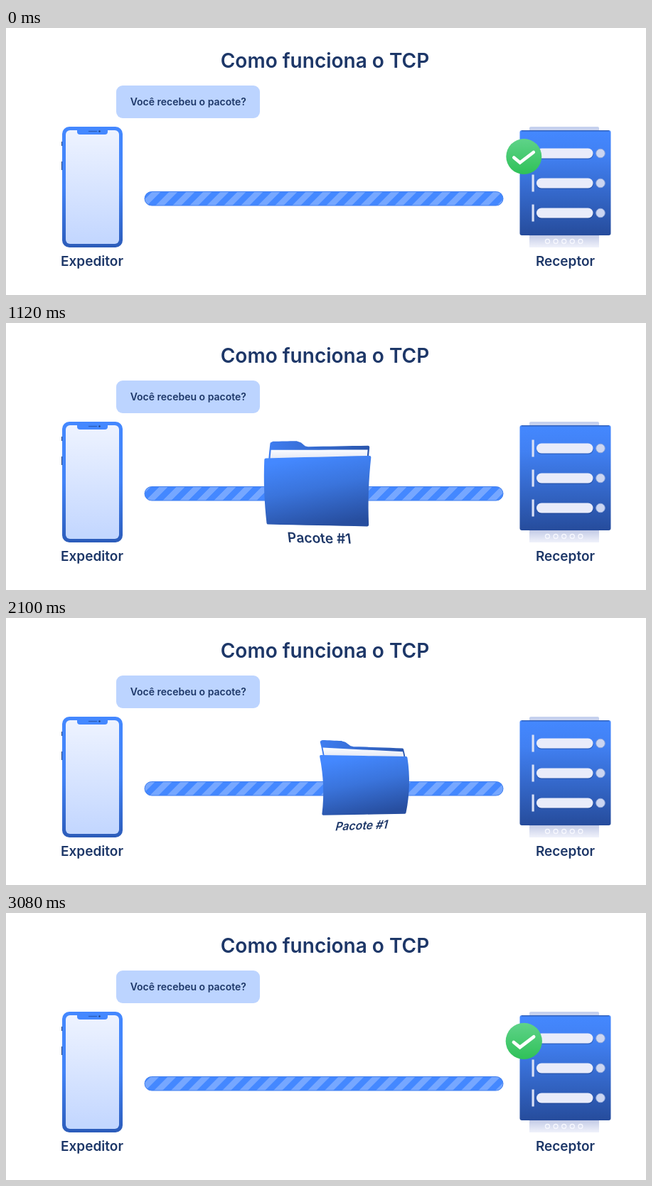
Write an HTML page that moves like this. It is 900 px wide and 376 px high and loops after 3.15 s.

```html
<!DOCTYPE html>
<html lang="pt">
<head>
<meta charset="utf-8">
<title>Como funciona o TCP</title>
<style>
  html, body { margin: 0; width: 100%; height: 100%; overflow: hidden; background: #fff; }
  svg { display: block; width: 900px; height: 376px; }
  text { font-family: Inter, "Open Sans", sans-serif; font-weight: 600; fill: #1d3768; text-anchor: middle; }
</style>
</head>
<body>
<svg viewBox="0 0 900 376">
  <defs>
    <linearGradient id="case" x2="0" y2="1">
      <stop stop-color="#4488ff"/><stop offset=".5" stop-color="#4283f7"/><stop offset="1" stop-color="#2c5cba"/>
    </linearGradient>
    <linearGradient id="screen" x2="0" y2="1">
      <stop stop-color="#eef3ff"/><stop offset="1" stop-color="#c2d6ff"/>
    </linearGradient>
    <linearGradient id="rack" x2="0" y2="1">
      <stop stop-color="#4488ff"/><stop offset=".25" stop-color="#4180f2"/><stop offset="1" stop-color="#264c9c"/>
    </linearGradient>
    <linearGradient id="foot" x2="0" y2="1">
      <stop stop-color="#bfc7e4"/><stop offset="1" stop-color="#f0f2fb"/>
    </linearGradient>
    <linearGradient id="front" x1=".35" y1="0" x2=".65" y2="1">
      <stop stop-color="#4488ff"/><stop offset=".45" stop-color="#3a74dc"/><stop offset="1" stop-color="#274e9f"/>
    </linearGradient>
    <linearGradient id="back" x2="1" y2="0">
      <stop stop-color="#3f7df0"/><stop offset="1" stop-color="#2a56ad"/>
    </linearGradient>
    <linearGradient id="paper" x2="0" y2="1">
      <stop stop-color="#fbfcff"/><stop offset="1" stop-color="#d5dcef"/>
    </linearGradient>
    <linearGradient id="green" x2="0" y2="1">
      <stop stop-color="#5fd389"/><stop offset="1" stop-color="#2fc158"/>
    </linearGradient>
    <pattern id="stripes" width="24" height="40" patternUnits="userSpaceOnUse">
      <rect width="24" height="40" fill="#76a7ff"/>
      <rect width="12" height="40" fill="#4488ff"/>
    </pattern>
  </defs>

  <text x="448.5" y="56" font-size="28">Como funciona o TCP</text>

  <rect x="155" y="81" width="202" height="46" rx="9" fill="#bcd4ff"/>
  <text x="256.3" y="109" font-size="14">Você recebeu o pacote?</text>

  <g id="phone">
    <path d="M78.5 160v6M78.5 188v12" stroke="#22407c"/>
    <rect x="79" y="139" width="85" height="170" rx="10" fill="url(#case)"/>
    <rect x="84" y="144" width="75" height="160" rx="6" fill="url(#screen)"/>
    <path d="M100 143h43v3q0 4-4 4h-35q-4 0-4-4z" fill="#4488ff"/>
    <path d="M116 145.5h12" stroke="#2b5cb8" stroke-width="1.3"/>
    <circle cx="131.5" cy="145.5" r="1.2" fill="#22407c"/>
  </g>
  <text x="121" y="335" font-size="19">Expeditor</text>

  <g id="server">
    <rect x="736" y="139" width="98" height="12" rx="2" fill="#c6d1ee"/>
    <rect x="736" y="290" width="98" height="19" fill="url(#foot)"/>
    <rect x="722.5" y="144" width="128" height="148" rx="3" fill="url(#rack)"/>
    <path d="M725 144.8h123" stroke="#3263bd" stroke-width="1.6"/>
  </g>
  <text x="786.5" y="335" font-size="19">Receptor</text>

  <rect x="195" y="230.5" width="504" height="19.5" rx="9.75" fill="url(#stripes)" stroke="#417fee"/>

  <g id="folder">
    <path id="rear" fill="url(#back)" stroke="url(#back)" stroke-linejoin="round"/>
    <path id="sheet" fill="url(#paper)"/>
    <path id="cover" fill="url(#front)" stroke="url(#front)" stroke-linejoin="round"/>
    <text id="label" font-size="19.6">Pacote #1</text>
  </g>

  <g id="check">
    <circle r="25" fill="url(#green)"/>
    <path d="M-14 1.5L-5.5 8.5L13.5-6" fill="none" stroke="#fff" stroke-width="4.6" stroke-linecap="round"/>
  </g>
</svg>

<script>
const LOOP = 3150, STEP = 70, MIDDLE = 1400, HALF = 1330, PERIOD = 24;
const $ = id => document.getElementById(id);
const clamp = v => Math.max(0, Math.min(1, v));

// Folder outlines around its centre, at full size
const SHAPES = {
  rear: "-68,-70 -66,-71 -33,-71 -27,-69 -20,-63.5 -15,-62.5 71,-62.5 71,-30 -68,-30",
  sheet: "-68,-61 71,-59 71,-40 -68,-40",
  cover: "-74,-47 74.5,-48.5 71.5,45 -70.5,44"
};
for (const id in SHAPES) SHAPES[id] = SHAPES[id].split(" ").map(p => p.split(",").map(Number));

// u runs from -1 to 1 over the flight; it is slowest and largest at 0
function poseAt(u) {
  const tilt = Math.sin(2.6 * u);
  const sy = .87 + .16 * Math.cos(Math.PI * u);
  return {
    x: 452.5 + 66 * u + 10 * u ** 2 + 84 * u ** 3,
    y: 238.5 - 12 * (1 - sy),
    sx: sy * (1 - .06 * tilt ** 2),
    sy, tilt
  };
}

// Perspective tilt with a sideways bow
const warp = (p, x, y) => [
  p.x + x * p.sx + 4 * p.tilt * (1 - (y / 50) ** 2),
  p.y + y * p.sy * (1 - .042 * p.tilt * x / 76)
];

function outline(points, pose) {
  const n = 8, out = [];
  points.forEach(([x, y], i) => {
    const [x2, y2] = points[(i + 1) % points.length];
    for (let k = 0; k < n; k++) {
      const q = warp(pose, x + (x2 - x) * k / n, y + (y2 - y) * k / n);
      out.push(q.map(v => v.toFixed(2)).join(" "));
    }
  });
  return "M" + out.join("L") + "Z";
}

function drawFolder(t) {
  const u = Math.max(-1, Math.min(1, (t - MIDDLE) / HALF));
  const pose = poseAt(u);
  $("folder").setAttribute("opacity", clamp((1 - Math.abs(u)) * HALF / 490));
  for (const id in SHAPES) {
    $(id).setAttribute("d", outline(SHAPES[id], pose));
    if (id !== "sheet") $(id).setAttribute("stroke-width", 4.5 * pose.sx);
  }
  // Local slope of the warp carries the caption
  const lx = 1, ly = 71.5;
  const o = warp(pose, lx, ly), a = warp(pose, lx + 1, ly), b = warp(pose, lx, ly + 1);
  const m = [a[0] - o[0], a[1] - o[1], b[0] - o[0], b[1] - o[1], ...o];
  $("label").setAttribute("transform", `matrix(${m.join(" ")})`);
}

// Grows past full size and settles
function backOut(x) {
  const d = x - 1;
  return 1 + 3.5 * d ** 3 + 2.5 * d ** 2;
}

function drawCheck(t) {
  const size = t < MIDDLE ? 1 - clamp(t / 280) ** 2 : Math.max(0, backOut(clamp((t - 2500) / 650)));
  $("check").setAttribute("visibility", size > 0 ? "visible" : "hidden");
  $("check").setAttribute("transform", `translate(728.3 ${203.5 - 22.5 * size}) scale(${size})`);
}

function draw(now) {
  const t = Math.floor((now % LOOP) / STEP) * STEP;
  const shift = 198.2 + 4 * PERIOD * t / LOOP;
  $("stripes").setAttribute("patternTransform", `translate(${shift} 250) skewX(-45)`);
  drawFolder(t);
  drawCheck(t);
}

$("server").insertAdjacentHTML("beforeend",
  [0, 1, 2].map(i => 176.5 + 42 * i).map(y => `
    <rect x="739.5" y="${y - 12}" width="3.2" height="24" fill="#d9e0f5"/>
    <rect x="746" y="${y - 5.5}" width="80" height="14" rx="7" fill="#1c3c80" opacity=".35"/>
    <rect x="746" y="${y - 7}" width="79.5" height="14" rx="7" fill="#e9ecfa"/>
    <circle cx="836" cy="${y}" r="6.3" fill="#cbd5f1" stroke="#8ea6da"/>`).join("") +
  [0, 1, 2, 3, 4].map(i =>
    `<circle cx="${761.5 + 11.6 * i}" cy="300.5" r="3" fill="none" stroke="#f7f8fe" stroke-width="1.3"/>`).join(""));

const start = performance.now();
function tick() {
  draw(performance.now() - start);
  requestAnimationFrame(tick);
}
tick();
</script>
</body>
</html>
```
